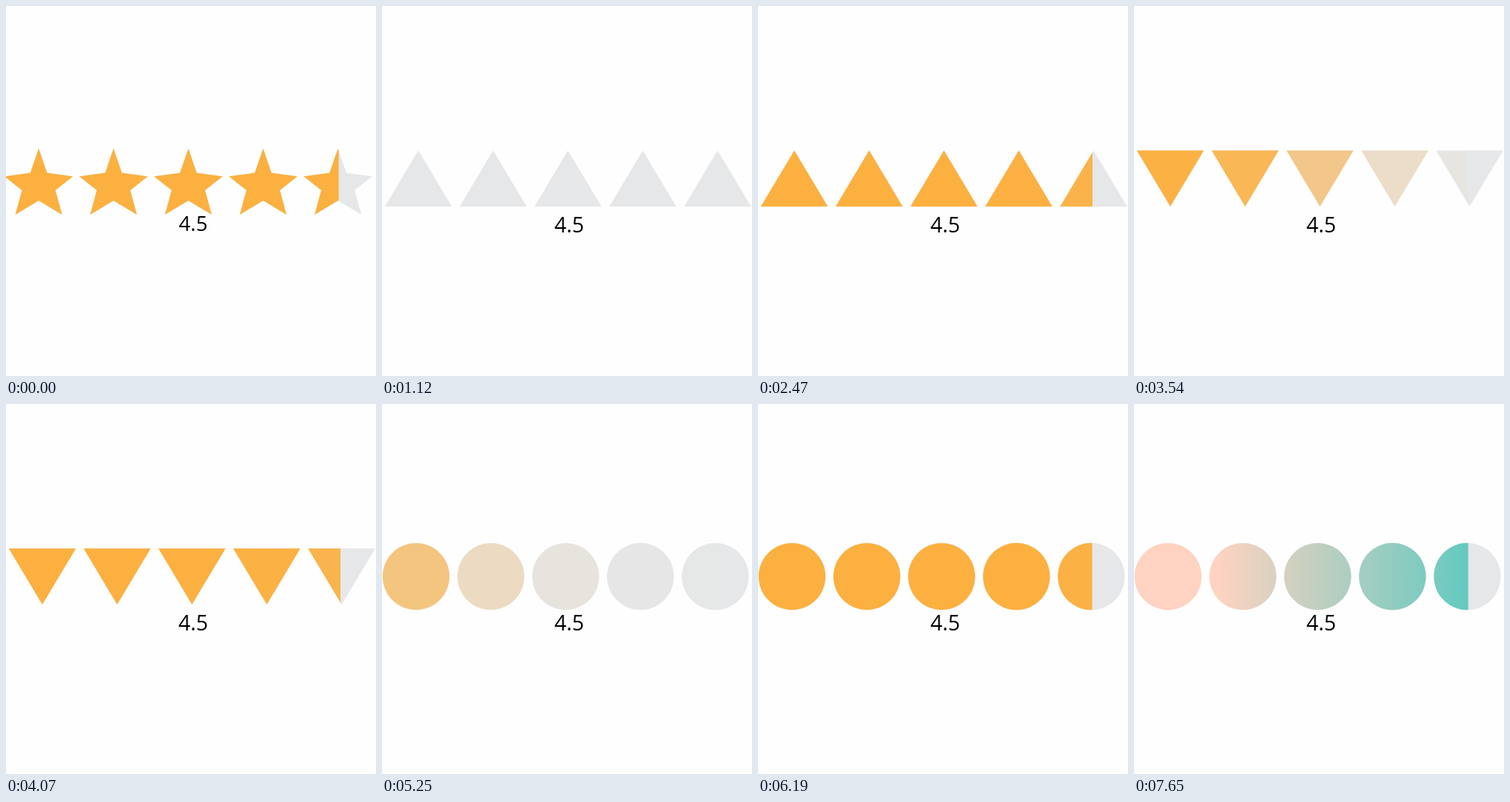
An HTML page for the animation above (9740 ms loop, 500 px wide and 500 px high).

```html
<!DOCTYPE html>
<html lang="en">
<head>
<meta charset="utf-8">
<title>Rating</title>
<style>
  html, body { margin: 0; width: 100%; height: 100%; overflow: hidden; background: #fefefe; }
  svg { display: block; width: 100vw; height: 100vh; }
  text { font-family: "Open Sans", "Noto Sans", sans-serif; text-anchor: middle; fill: #000; }
</style>
</head>
<body>
<svg viewBox="0 0 500 500" xmlns="http://www.w3.org/2000/svg">
  <defs>
    <linearGradient id="blend" gradientUnits="userSpaceOnUse" x1="110" y1="0" x2="455" y2="0">
      <stop offset="0" stop-color="#ffd3c1"/>
      <stop offset="1" stop-color="#62c9c0"/>
    </linearGradient>
    <clipPath id="half"><rect id="cut" x="0" y="0" width="450" height="500"/></clipPath>
  </defs>
  <g id="empty" fill="#e6e7e8"></g>
  <g id="full" clip-path="url(#half)"></g>
  <text id="score" x="253">4.5</text>
</svg>
<script>
const LOOP = 9740, COUNT = 5, PITCH = 101.1, STAGGER = 160, SOFT = 95;
const ORANGE = '#fcb040';
const $ = id => document.getElementById(id);

const polygon = pts => x => 'M' + pts.map(([px, py]) => `${x + px} ${py}`).join('L') + 'Z';
const star = polygon([
  [0, 192.5], [11.3, 225.5], [46.3, 230.3], [22.6, 249], [31.6, 282],
  [0, 263], [-31.6, 282], [-22.6, 249], [-46.3, 230.3], [-11.3, 225.5]
]);
const up = polygon([[0, 195.3], [45.3, 271], [-45.3, 271]]);
const down = polygon([[-45.3, 195.3], [45.3, 195.3], [0, 271]]);
const circle = x => `M${x - 45.2} 233.1a45.2 45.2 0 1 1 90.4 0a45.2 45.2 0 1 1 -90.4 0Z`;

// Fills rise one after another along an S-curve, held outside [from, to].
const wave = (from, to, mid) => (t, i) =>
  t < from ? 0 : 1 / (1 + Math.exp(-(Math.min(t, to) - mid - i * STAGGER) / SOFT));

const POP = [6820, 7020, 7130, 7130, 7270];

const scenes = [
  { at: 0, shape: star, x: 44.2, split: 449.6, paint: ORANGE, level: () => 1, size: 27.5, base: 304 },
  { at: 1120, shape: up, x: 49.1, split: 452, paint: ORANGE, level: wave(1440, 2470, 1580) },
  { at: 2730, shape: down, x: 49.1, split: 452, paint: ORANGE, level: wave(3050, 4070, 3197) },
  { at: 4690, shape: circle, x: 46, split: 451.6, paint: ORANGE, level: wave(5010, 6190, 5204) },
  { at: 6320, shape: circle, x: 46, split: 451.6, paint: 'url(#blend)', level: (t, i) => +(t >= POP[i]) }
];

const addPaths = group => Array.from({ length: COUNT }, () =>
  group.appendChild(document.createElementNS('http://www.w3.org/2000/svg', 'path')));
const empties = addPaths($('empty'));
const fills = addPaths($('full'));
let current = null;

function enter(scene) {
  current = scene;
  for (let i = 0; i < COUNT; i++) {
    const d = scene.shape(scene.x + i * PITCH);
    empties[i].setAttribute('d', d);
    fills[i].setAttribute('d', d);
  }
  $('full').setAttribute('fill', scene.paint);
  $('cut').setAttribute('width', scene.split);
  $('score').setAttribute('font-size', scene.size || 28.5);
  $('score').setAttribute('y', scene.base || 306);
}

function draw(t) {
  const scene = scenes.filter(s => s.at <= t).pop();
  if (scene !== current) enter(scene);
  fills.forEach((path, i) => path.setAttribute('fill-opacity', scene.level(t, i).toFixed(3)));
}

const start = performance.now();
function tick() {
  draw((performance.now() - start) % LOOP);
  requestAnimationFrame(tick);
}
tick();
</script>
</body>
</html>
```
